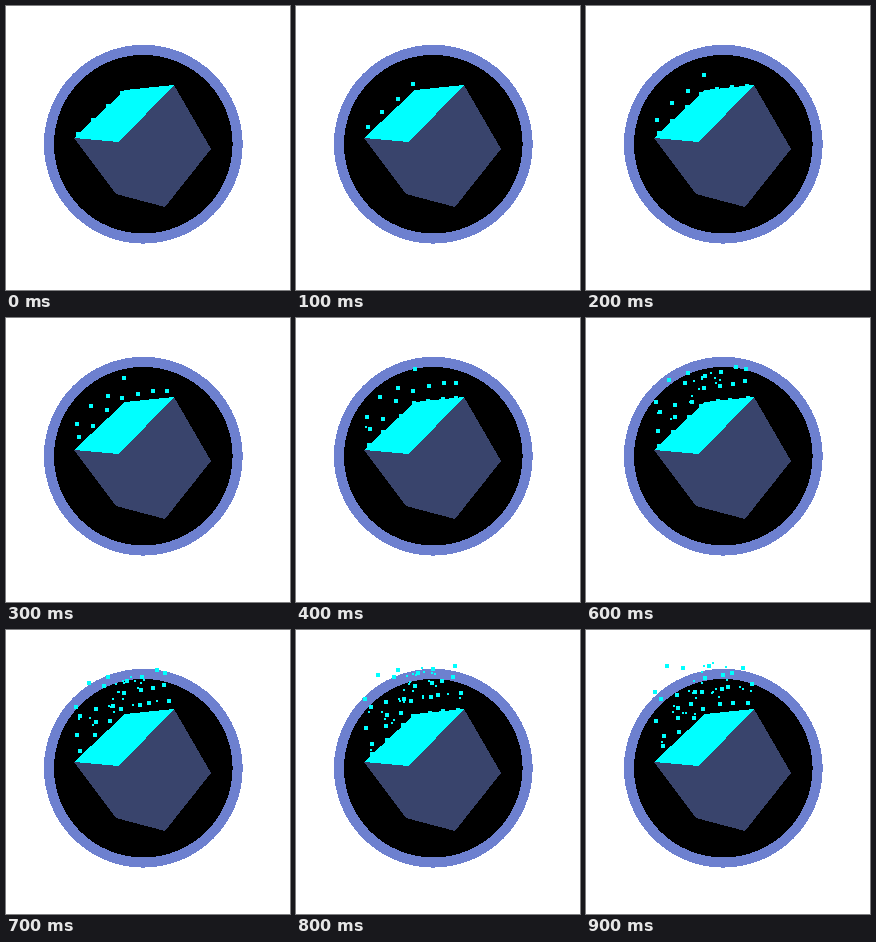
Recreate the animation shown at these times as an HTML page with a canvas. Size 284 by 284 pixels, loop 1 s.

```html
<!DOCTYPE html>
<html lang="en">
<head>
<meta charset="utf-8">
<title>Dissolving cube</title>
<style>
  html, body { margin: 0; width: 100%; height: 100%; overflow: hidden; background: #fff; }
  svg, canvas { position: absolute; left: 0; top: 0; }
</style>
</head>
<body>
<svg width="284" height="284" shape-rendering="crispEdges">
  <circle cx="137.3" cy="138.2" r="99.4" fill="#6d80cf"/>
  <circle cx="137.3" cy="138.2" r="89.3"/>
  <path d="M68 132 119 84 168 79 205 143 159 201 110 188Z" fill="#39446c"/>
  <path d="M68 132 119 84 168 79 113 136Z" fill="#0ff"/>
</svg>
<canvas id="stage" width="284" height="284"></canvas>
<script>
const ctx = document.getElementById('stage').getContext('2d');
const LOOP = 1000, STEP = 100, STEPS = LOOP / STEP;
const LEFT = 68, CORNER = 119, RIGHT = 168, CEILING = 33;
ctx.fillStyle = '#0ff';

function seeded(seed) {
  return () => (seed = (seed * 16807) % 2147483647) / 2147483647;
}
const rnd = seeded(77);
const spread = size => (rnd() - 0.5) * size;

// Height of the back edges of the top face.
const edge = x => x < CORNER ? 132 - (x - LEFT) * 0.94 : 84 - (x - CORNER) * 0.1;

// Large sparks leave evenly spaced slots every second step;
// the right edge starts one wave later.
function makeSparks() {
  const list = [];
  for (let wave = 0; wave < STEPS / 2; wave++) {
    for (let slot = 0; slot < 7; slot++) {
      const x = 72 + slot * 14.8 + spread(wave * 3);
      const born = 2 * wave + (x > CORNER ? 2 : 0);
      list.push({ x, y: edge(x), born, life: STEPS, dx: 0.6 + spread(2.5), dy: -7 - rnd() * 2 });
    }
  }
  return list;
}

// Fine dust appears near the edges in the second half and fades out sooner.
function makeDust(count) {
  return Array.from({ length: count }, (_, i) => {
    const x = LEFT + rnd() * (RIGHT - LEFT);
    const born = 4 + 5 * i / count;
    return { x, y: edge(x) - 3 - rnd() * 24, born, life: 4, dx: 0.8 + spread(3), dy: -6 - rnd() * 4 };
  });
}

const sparks = makeSparks();
const dust = makeDust(32);

function drawAll(list, step, size) {
  for (const p of list) {
    const age = step - p.born;
    const x = p.x + p.dx * age, y = p.y + p.dy * age;
    if (age < 0 || age > p.life || y < CEILING) continue;
    ctx.fillRect(Math.round(x - size / 2), Math.round(y - size / 2), size, size);
  }
}

function tick() {
  const step = Math.floor((performance.now() % LOOP) / STEP);
  ctx.clearRect(0, 0, 284, 284);
  drawAll(sparks, step, 4);
  drawAll(dust, step, 2);
  requestAnimationFrame(tick);
}
tick();
</script>
</body>
</html>
```
